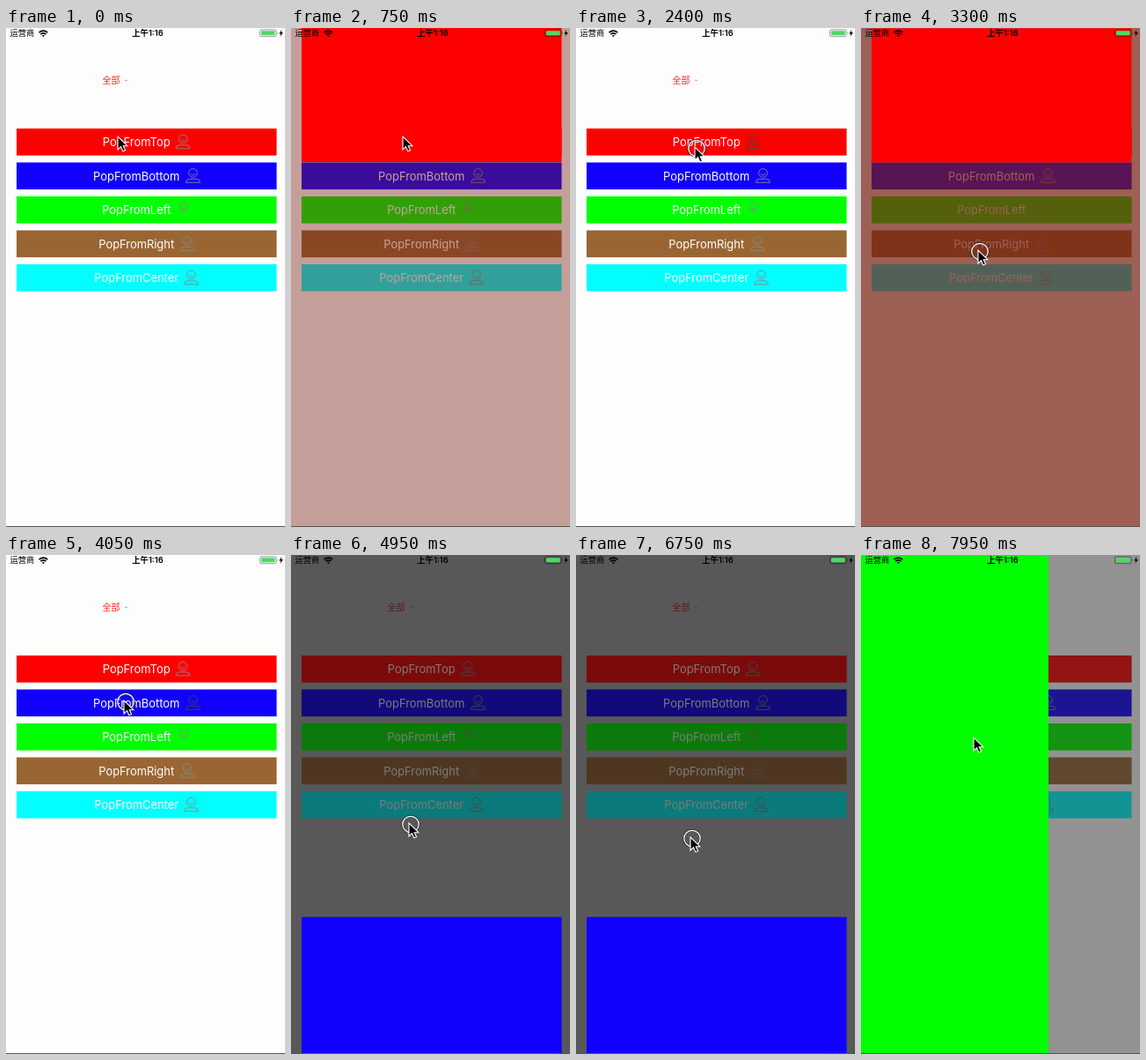
Write an HTML page that moves like this. It is 317 by 566 pixels and loops after 8000 ms.

```html
<!DOCTYPE html>
<html lang="zh">
<head>
<meta charset="utf-8">
<style>
html, body { margin: 0; width: 100%; height: 100%; overflow: hidden; background: #fdfdfd; }
svg { display: block; width: 100%; height: 100%; }
text { font-family: Inter, "Noto Sans CJK SC", "Noto Sans CJK", sans-serif; }
.label { font-size: 12.9px; fill: #fff; text-anchor: middle; }
.icon { fill: none; stroke: #888; stroke-width: .9; }
</style>
</head>
<body>
<svg viewBox="0 0 317 566" xmlns="http://www.w3.org/2000/svg">
  <rect width="317" height="566" fill="#fdfdfd"/>
  <text x="109.5" y="63" font-size="10" fill="#f22">全部</text>
  <path d="M135 59.3h3" stroke="#b99" stroke-width="1"/>
  <g id="buttons"></g>
  <rect id="dim" width="317" height="566"/>
  <use id="glow" href="#buttons"/>
  <rect id="popup"/>
  <path d="M0 565.5h317" stroke="#555"/>

  <g id="status">
    <text x="4.5" y="9.3" font-size="9.3">运营商</text>
    <text x="161" y="9.3" font-size="9.3" font-weight="600" text-anchor="middle">上午1:16</text>
    <g fill="none" stroke="#000" stroke-width="1.6">
      <path d="M37.5 5.2q4.9-4.2 9.8 0M39.3 7.2q3.1-2.6 6.2 0"/>
    </g>
    <path d="M40.9 8.6q1.5-1.2 3 0l-1.5 1.7z"/>
    <rect x="288.5" y="1.9" width="18.6" height="7.8" rx="2" fill="none" stroke="#000" stroke-opacity=".45" stroke-width=".9"/>
    <rect x="290" y="3.3" width="15.6" height="5" rx=".8" fill="#4cd964"/>
    <path d="M308.2 4.5q1.2 1.3 0 2.6z" fill-opacity=".5"/>
    <path d="M313.3 1.8l-3 4.7h2l-.9 3.5 3.4-4.9h-2.1z"/>
  </g>

  <g id="cursor">
    <g id="ring" fill="none">
      <circle cx="2" cy="1.5" r="9.4" stroke="#222" stroke-width="2.4"/>
      <circle cx="2" cy="1.5" r="9.2" stroke="#fff" stroke-width="1.3"/>
    </g>
    <path d="M0 0v15l3.5-3.3 2.4 5.2 2.7-1.2-2.4-5h4.6z" fill="#000" stroke="#fff" stroke-width="1.1"/>
  </g>
</svg>
<script>
const $ = id => document.getElementById(id);
const LOOP = 8000, STEP = 150, HOLD = 600;

const buttons = [
  ['Top', '#ff0000', 201], ['Bottom', '#1200ff', 212.5], ['Left', '#00ff00', 202],
  ['Right', '#996633', 206], ['Center', '#00ffff', 210.5]
];
$('buttons').innerHTML = buttons.map(([side, color, iconX], i) => {
  const base = side === 'Left' ? '' : '<path d="M-8 10.8q0-4 4-4h8q4 0 4 4z"/>';
  return `<g transform="translate(0 ${114 + i * 38.5})">
    <rect x="12" width="295.5" height="30.6" fill="${color}"/>
    <text class="label" x="148.2" y="20">PopFrom${side}</text>
    <g class="icon" id="icon${side}" transform="translate(${iconX} 12)">
      <circle r="4.9"/><path d="M-2.6 1q2.6 2.8 5.2 0"/>${base}
    </g></g>`;
}).join('');

// dx, dy: direction in which the closed popup hides
const popups = {
  Top: { x: 12, y: 0, w: 295.5, h: 152, dx: 0, dy: -1, color: '#ff0000', dim: '#751e0f', alpha: .7, glow: 0 },
  Bottom: { x: 12, y: 411, w: 295.5, h: 155, dx: 0, dy: 1, color: '#1200ff', dim: '#151313', alpha: .7, glow: .2 },
  Left: { x: 0, y: 0, w: 213, h: 565, dx: -1, dy: 0, color: '#00ff00', dim: '#282828', alpha: .5, glow: 0 }
};
const visits = [
  ['Top', 600, 1650], ['Top', 2400, 3300], ['Bottom', 4050, 4950],
  ['Bottom', 5850, 6750], ['Left', 7500, Infinity]
];
const path = [
  [0, 127, 123], [750, 127, 123], [1500, 127, 238], [1800, 127, 238],
  [2250, 135, 135], [2550, 135, 135], [3150, 133, 252], [3450, 133, 252],
  [3900, 134, 165], [4200, 134, 165], [4800, 134, 304], [5100, 134, 304],
  [5700, 133, 168], [6000, 133, 168], [6600, 130, 320], [6900, 130, 320],
  [7350, 128, 207], [8000, 128, 207]
];

const clamp = v => Math.min(1, Math.max(0, v));
const ease = v => v * v * (3 - 2 * v);
const spring = s => 1 - Math.exp(-6.6 * s) * Math.cos(Math.PI * s / .3);

function cursorAt(t) {
  const i = path.findIndex(p => p[0] > t);
  const [t0, x0, y0] = path[i - 1], [t1, x1, y1] = path[i];
  const k = ease((t - t0) / (t1 - t0));
  return [x0 + (x1 - x0) * k, y0 + (y1 - y0) * k];
}

function render(time) {
  const t = time < HOLD ? 0 : Math.floor(time / STEP) * STEP;
  const [side, open, close] = visits.filter(v => v[1] <= t).pop() || visits[0];
  const p = popups[side];
  const closing = ease(clamp((t - close) / 300));
  const shown = t <= open ? 0 : t > close ? 1 - closing : spring((t - open) / 1000);
  const shade = clamp((t - open) / 250) * (1 - closing);
  const set = (id, attrs) => {
    for (const name in attrs) $(id).setAttribute(name, attrs[name]);
  };

  set('popup', {
    x: p.x + p.dx * p.w * (1 - shown), y: p.y + p.dy * p.h * (1 - shown),
    width: p.w, height: p.h, fill: p.color, opacity: shown > 0 ? 1 : 0
  });
  set('dim', { fill: p.dim, opacity: p.alpha * shade });
  set('glow', { opacity: p.glow * shade });

  const clicked = visits.some(v => v[1] === t || v[2] === t);
  set('ring', { opacity: clicked ? 1 : 0 });
  set('cursor', { transform: `translate(${cursorAt(t)})` });
  for (const [name] of buttons) {
    const pressed = visits.some(v => v[0] === name && v[1] === t);
    $('icon' + name).style.stroke = pressed ? '#444' : '#888';
  }
}

let start;
function tick(now) {
  start ??= now;
  render((now - start) % LOOP);
  requestAnimationFrame(tick);
}
render(0);
requestAnimationFrame(tick);
</script>
</body>
</html>
```
